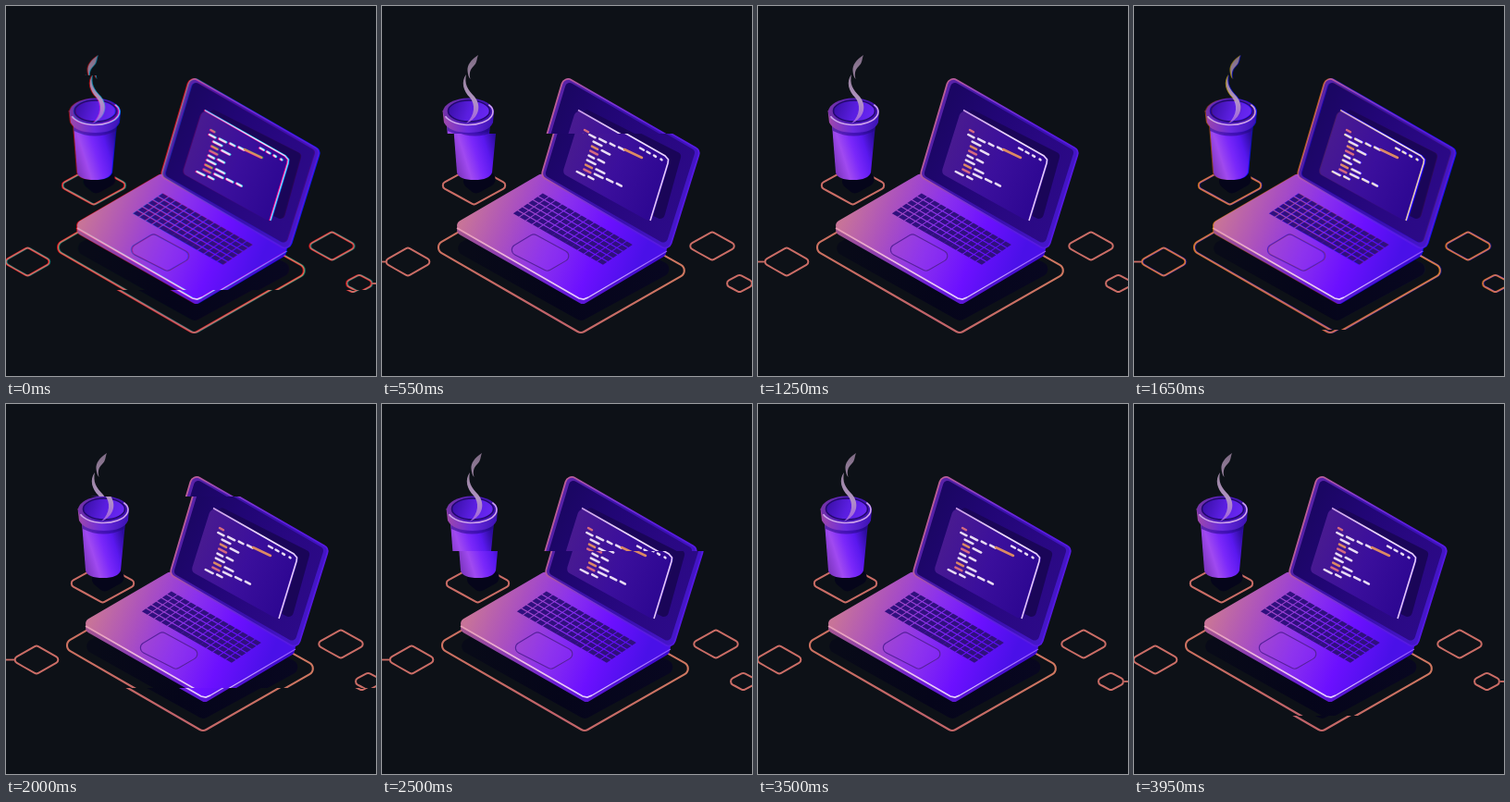
Write an HTML page with a canvas that moves like this. It is 400 px wide and 400 px high and loops after 4 s.

```html
<!DOCTYPE html>
<html lang="en">
<head>
<meta charset="utf-8">
<title>Laptop and coffee</title>
<style>
html, body { margin: 0; width: 100%; height: 100%; overflow: hidden; background: #0d1117; }
canvas { display: block; width: 100vw; height: 100vh; }
</style>
</head>
<body>
<canvas id="stage" width="400" height="400"></canvas>
<script>
const SIZE = 400, PAD = 24, STEP = 50, LOOP = 4000, BG = '#0d1117';

function layer() {
  const c = document.createElement('canvas');
  c.width = SIZE + PAD * 2;
  c.height = SIZE;
  return c;
}

function rnd(n) {
  const s = Math.sin(n * 12.9898) * 43758.5453;
  return s - Math.floor(s);
}

const art = layer();
const g = art.getContext('2d');

function grad(x0, y0, x1, y1, ...colors) {
  const f = g.createLinearGradient(x0, y0, x1, y1);
  colors.forEach((c, i) => f.addColorStop(i / (colors.length - 1), c));
  return f;
}

// Closed polygon with rounded corners
function poly(pts, r) {
  const n = pts.length, last = pts[n - 1];
  g.beginPath();
  g.moveTo((last[0] + pts[0][0]) / 2, (last[1] + pts[0][1]) / 2);
  pts.forEach((p, i) => g.arcTo(...p, ...pts[(i + 1) % n], r));
  g.closePath();
}

function fill(style) { g.fillStyle = style; g.fill(); }

function stroke(style, width) {
  g.strokeStyle = style;
  g.lineWidth = width;
  g.stroke();
}

function line(pts, style, width) {
  g.beginPath();
  pts.forEach(p => g.lineTo(...p));
  stroke(style, width);
}

function blob(d, style) { g.fillStyle = style; g.fill(new Path2D(d)); }

function oval(x, y, rx, ry, from = 0, to = 7) {
  g.beginPath();
  g.ellipse(x, y, rx, ry, 0, from, to);
}

function mat(x, y, w, h) {
  poly([[x - w, y], [x, y - h], [x + w, y], [x, y + h]], 4);
  stroke('#cb6d66', 2);
}

function drawFloor() {
  poly([[50, 261], [166, 194], [330, 286], [211, 354]], 7);
  stroke(grad(57, 260, 323, 290, '#cc7160', '#c0626a', '#d07860'), 2.1);
  poly([[70, 262], [160, 210], [316, 284], [211, 341]], 8);
  fill(grad(90, 260, 300, 300, '#080a18', '#05051a', '#080720'));

  mat(24, 276.5, 27.5, 15.5);
  mat(353, 259.5, 28, 15.5);
  mat(382.5, 300, 18, 9.5);
  line([[-12, 276.5], [0, 276.5]], '#cb6d66', 1.8);
  line([[397, 300], [404, 300]], '#cb6d66', 1.8);
}

function drawCup() {
  mat(95.5, 194, 38, 21);
  poly([[78, 188], [106, 172], [124, 189], [97, 204]], 8);
  fill('#05051a');

  blob('M73 128 L77 180 Q79 188 96 188 Q112 188 115 180 L120 128 Z',
    grad(73, 165, 121, 150, '#7c35c0', '#a04af0', '#7a28fa', '#5a18ee', '#2c0c9c'));
  blob('M73 126 L74 135 Q96 146 119 135 L120 126 Z', 'rgba(35,8,130,.55)');
  blob('M68.5 113 L70 126 Q76 137 97 137 Q118 137 123 126 L124 113 Z',
    grad(69, 120, 124, 124, '#a04aa8', '#6a2ae0', '#3c12b4'));
  oval(96.5, 114.5, 27.5, 15);
  fill(grad(70, 105, 122, 122, '#7a36a8', '#4a18b8', '#4514b4'));
  oval(97, 113.5, 22.5, 11.5);
  fill(grad(76, 106, 118, 122, '#3a0fa8', '#5a1ee0', '#6a28f4'));
  stroke('#22086e', 1.6);
  oval(96.5, 114.5, 26.5, 14, -.6, 2.8);
  stroke('#d0a4ee', 1.6);

  const steam = grad(100, 54, 100, 127, '#806c86', '#98829f', '#b294c4', '#a05ce4');
  blob('M107 53 C99 58 95 64 95.5 70 C96 75 97 77 98.5 79 C97 73 98 69 102 65 C106 61 105 58 107 53 Z', steam);
  blob('M94 74 C88 82 91 92 98 99 C104 106 104 118 94 127 C108 121 111 108 103 98 C95 90 92 84 94 74 Z', steam);
}

function drawBase() {
  poly([[71, 242], [168, 186], [309, 266], [213, 323]], 6);
  fill(grad(77, 240, 305, 270, '#a65791', '#6a1cd8', '#3a08cf'));
  poly([[71, 237.5], [168, 181], [310, 262], [213, 318]], 6);
  fill(grad(90, 215, 270, 290, '#c87498', '#aa50c0', '#8a30ee', '#6c10ff', '#4a10e8'));
  line([[77, 240], [209, 316], [214, 317], [219, 315]], grad(78, 240, 214, 316, '#e79ab4', '#f0c0e8', '#e6d0ff'), 1.7);
  line([[219, 315], [304, 265]], grad(214, 316, 303, 264, '#e6d0ff', '#8c50ff'), 1.3);

  // Keys are laid out on a skewed unit grid
  const cols = 14, rows = 6;
  g.save();
  g.transform(98 / cols, 56 / cols, -33 / rows, 22.5 / rows, 170, 202);
  g.fillStyle = '#30107e';
  for (let r = 0; r < rows; r++) {
    for (let c = 0; c < cols; c++) {
      const space = r === rows - 1 && c > 3 && c < 9;
      g.fillRect(c + .05, r + .1, space ? 1 : .86, .8);
    }
  }
  g.restore();

  poly([[130, 264], [160, 246], [204, 270], [175, 287]], 6);
  fill('rgba(150,60,235,.25)');
  stroke('#57219c', 1.1);
}

// Lines of code run along the slanted top edge of the window
function drawCode() {
  const W = '#eadcf4', O = '#dc8a62', P = '#d66a80';
  const dash = (x, y, n, c) => line([[x + 1, y], [x + n, y + n * .45]], c, 2.5);
  g.lineCap = 'round';
  for (let r = 0; r < 10; r++) {
    const indent = r > 1 && r < 9 ? 6 : 0;
    const count = r % 7 === 1 ? 4 : 1 + r % 2;
    for (let i = 0, at = indent; i < count; i++) {
      const n = 5 + rnd(r * 5 + i) * 5;
      const color = i ? W : [P, W, W, O][r % 4];
      dash(221 - 1.7 * r + at, 134 + 5 * r + at * .43, n, color);
      at += n + 3.5;
    }
  }
  dash(257, 155, 20, O);
  for (let i = 0; i < 4; i++) dash(274 + 7.5 * i, 153.5 + 4 * i, 5 - i, W);
  g.lineCap = 'butt';
}

function drawLid() {
  poly([[200, 75.5], [340, 156], [306, 265], [168, 184]], 7);
  fill(grad(175, 130, 335, 200, '#5c24a8', '#3c12ac', '#3a10b0', '#4616cc'));
  stroke(grad(170, 130, 338, 190, '#c8668a', '#8338d0', '#5c1ce0', '#5418e4'), 1.8);
  poly([[203, 80.5], [335, 156.5], [303, 258], [172, 183]], 5);
  fill(grad(185, 130, 330, 210, '#1b0664', '#220676', '#290882', '#2c0a88'));
  poly([[221, 110], [320, 160], [300, 232], [205, 186]], 5);
  fill('#1a0558');
  poly([[213, 111], [308, 165], [287, 234], [191, 181]], 6);
  fill(grad(200, 150, 300, 195, '#481a91', '#3b0f9c', '#2d0792'));
  line([[215, 112.5], [302, 162], [305.5, 166], [305, 170], [286, 232]],
    grad(216, 113, 300, 200, '#c99ce8', '#f0e0ff', '#e3c5fb'), 1.6);
  drawCode();
}

g.fillStyle = BG;
g.fillRect(0, 0, art.width, SIZE);
g.translate(PAD, 0);
drawFloor();
drawCup();
drawBase();
drawLid();

// One tinted copy per colour channel; added together they give the full picture
const channels = ['#f00', '#0f0', '#00f'].map(color => {
  const c = layer(), x = c.getContext('2d');
  x.drawImage(art, 0, 0);
  x.globalCompositeOperation = 'multiply';
  x.fillStyle = color;
  x.fillRect(0, 0, c.width, SIZE);
  return c;
});

// Sideways sway in px over the loop
function sway(t) {
  const a = t / LOOP * Math.PI * 2;
  return 4.3 + 4.8 * Math.cos(a - 2.83) + 1.2 * Math.sin(2 * a);
}

// Rows outside a wandering band are torn to the left: [ms, band top, band bottom]
const TEAR = 7;
const band = [
  [0, 75, 307], [550, 138, 400], [1250, 0, 400], [2000, 100, 307],
  [2950, 212, 400], [3500, 0, 400], [LOOP, 0, 330]
];

function bandAt(t) {
  const i = band.findIndex(k => k[0] > t), p = band[i - 1], q = band[i];
  const f = (t - p[0]) / (q[0] - p[0]);
  return [1, 2].map(k => Math.round(p[k] + (q[k] - p[k]) * f));
}

const ctx = document.getElementById('stage').getContext('2d');

function strip(y0, y1, shift, channel, split) {
  if (y1 <= y0) return;
  channels.forEach((c, k) => {
    const x = PAD - Math.round(shift) - (k === channel ? split : 0);
    ctx.drawImage(c, x, y0, SIZE, y1 - y0, 0, y0, SIZE, y1 - y0);
  });
}

function render(step) {
  const t = step * STEP, [top, bottom] = bandAt(t), shift = sway(t);
  const channel = Math.floor(rnd(step + .5) * 3);
  const split = Math.round(rnd(step + .7) * 2 - 1);
  ctx.globalCompositeOperation = 'source-over';
  ctx.fillStyle = '#000';
  ctx.fillRect(0, 0, SIZE, SIZE);
  ctx.globalCompositeOperation = 'lighter';
  strip(0, top, shift - TEAR, channel, split);
  strip(top, bottom, shift, channel, split);
  strip(bottom, SIZE, shift - TEAR, channel, split);
}

const start = performance.now();
let shown = -1;

function tick() {
  const step = Math.floor((performance.now() - start) % LOOP / STEP);
  if (step !== shown) render(shown = step);
  requestAnimationFrame(tick);
}
tick();
</script>
</body>
</html>
```
